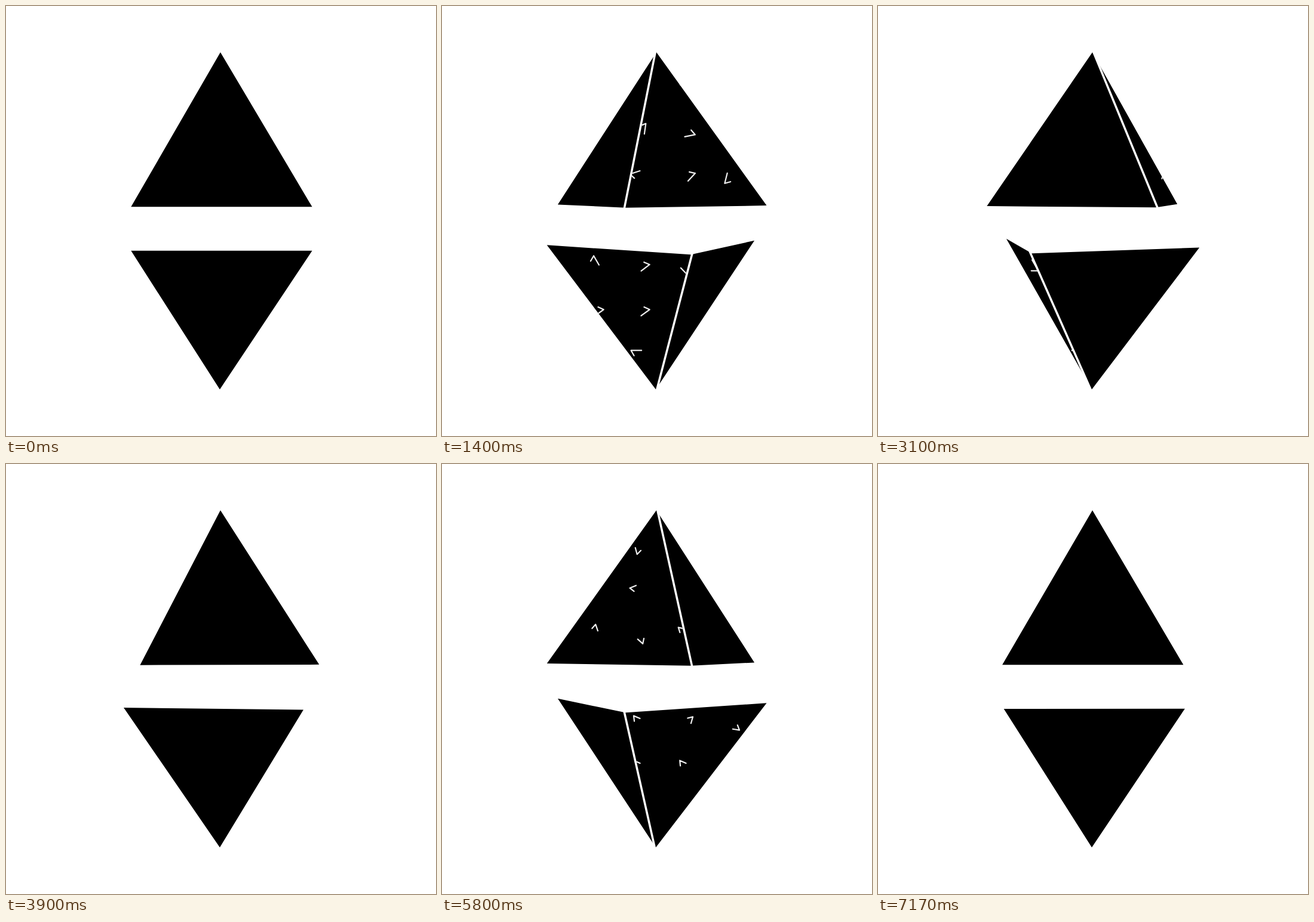
An HTML page that plays this animation: 720 px wide and 720 px high, repeating every 7210 ms.

```html
<!DOCTYPE html>
<html lang="en">
<head>
<meta charset="utf-8">
<title>Counter-rotating pyramids</title>
<style>
  html, body { margin: 0; width: 100%; height: 100%; overflow: hidden; background: #fff; }
  svg { display: block; width: 100vw; height: 100vh; }
  polygon { fill: #000; stroke: #fff; stroke-width: 7; stroke-miterlimit: 2; paint-order: stroke; }
  path { fill: none; stroke: #eee; stroke-width: 2.2; stroke-linecap: round; stroke-linejoin: round; }
</style>
</head>
<body>
<svg id="stage" viewBox="0 0 720 720"></svg>
<script>
const LOOP = 7210, STEPS = 144, TURN = 72;
const RADIUS = 178.8, DEPTH = 0.235;
const SIDE = 29, COLUMNS = 4, COLUMN_GAP = 77, ROW_GAP = 75;
const RAD = Math.PI / 180;

// Rows of small triangles: tilt of the first one, twist from each to the next.
const solids = [
  {
    dir: 1, apex: [359, 77.5], horizon: 317.7, drop: 15.5, firstRow: 135,
    rows: [{ tilt: -110, twist: 5 }, { tilt: -93, twist: 71 }, { tilt: 71, twist: 151 }]
  },
  {
    dir: -1, apex: [358, 642], horizon: 328.5, drop: 67.8, firstRow: 435,
    rows: [{ tilt: -60, twist: 83 }, { tilt: 24, twist: 0 }, { tilt: -120, twist: 0 }]
  }
];

const stage = document.getElementById('stage');
function add(parent, tag, attrs = {}) {
  const el = document.createElementNS('http://www.w3.org/2000/svg', tag);
  for (const key in attrs) el.setAttribute(key, attrs[key]);
  return parent.appendChild(el);
}

solids.forEach((solid, s) => {
  solid.group = add(stage, 'g');
  solid.faces = [0, 1, 2, 3].map(k => {
    const id = `face${s}${k}`;
    const group = add(solid.group, 'g');
    const clip = add(add(group, 'clipPath', { id }), 'polygon');
    const shape = add(group, 'polygon');
    const marks = k % 2 ? add(group, 'path', { 'clip-path': `url(#${id})` }) : null;
    return { k, group, clip, shape, marks };
  });
});

const lerp = (a, b, u) => a + (b - a) * u;
const wrap = deg => ((deg % 360) + 540) % 360 - 180;
const polar = (x, y, r, deg) => [x + r * Math.cos(deg * RAD), y + r * Math.sin(deg * RAD)];
const format = point => point.map(v => v.toFixed(2)).join();

// Slow start and end over one full turn.
function turnAngle(p) {
  const w = 2 * Math.PI * p;
  return 360 * (p - 0.0957 * Math.sin(w) - 0.0145 * Math.sin(2 * w) - 0.0053 * Math.sin(3 * w));
}

function baseCorner(solid, deg) {
  const scale = 1 / (1 - DEPTH * Math.cos(deg * RAD));
  return [
    359 + 10 * (scale - 1) + solid.dir * RADIUS * Math.sin(deg * RAD) * scale,
    solid.horizon + solid.drop * scale
  ];
}

// Part of a triangle's outline, tail and head counted in sides.
function trace(x, y, tilt, tail, head) {
  const corner = i => polar(x, y, SIDE / Math.sqrt(3), tilt + 210 + 120 * i);
  const at = u => {
    const i = Math.floor(u), a = corner(i), b = corner(i + 1);
    return [lerp(a[0], b[0], u - i), lerp(a[1], b[1], u - i)];
  };
  const points = [at(tail)];
  for (let i = Math.floor(tail) + 1; i < head; i++) points.push(corner(i));
  points.push(at(head));
  return 'M' + points.map(format).join('L');
}

// A stroke runs round every triangle while its face swings past.
function marksPath(solid, facing) {
  const tail = 0.17 + 0.0153 * facing, head = 1 + 0.0194 * facing;
  let d = '';
  solid.rows.forEach(({ tilt, twist }, r) => {
    for (let c = 0; c < COLUMNS; c++) {
      d += trace(254 + COLUMN_GAP * c, solid.firstRow + ROW_GAP * r, tilt + twist * c, tail, head);
    }
  });
  return d;
}

function drawSolid(solid, theta) {
  const [ax, ay] = solid.apex;
  for (const face of solid.faces) {
    face.facing = wrap(theta - 90 * face.k);
    const a = baseCorner(solid, face.facing - 45), b = baseCorner(solid, face.facing + 45);
    const area = (b[0] - a[0]) * (ay - a[1]) - (b[1] - a[1]) * (ax - a[0]);
    const visible = area < 0;
    face.group.style.display = visible ? '' : 'none';
    if (!visible) continue;
    const points = [solid.apex, a, b].map(format).join(' ');
    face.shape.setAttribute('points', points);
    face.clip.setAttribute('points', points);
    if (face.marks) face.marks.setAttribute('d', marksPath(solid, face.facing));
  }
  // The face turned most towards us goes on top, its white rim forms the gap.
  [...solid.faces]
    .sort((f, g) => Math.abs(g.facing) - Math.abs(f.facing))
    .forEach(face => solid.group.appendChild(face.group));
}

function render(ms) {
  const t = ms % LOOP;
  const step = Math.min(STEPS - 1, 2 * Math.floor(t / 100) + (t % 100 >= 70 ? 1 : 0));
  const theta = turnAngle((step % TURN) / TURN);
  solids.forEach(solid => drawSolid(solid, theta));
}

const start = performance.now();
function tick() {
  render(performance.now() - start);
  requestAnimationFrame(tick);
}
tick();
</script>
</body>
</html>
```
